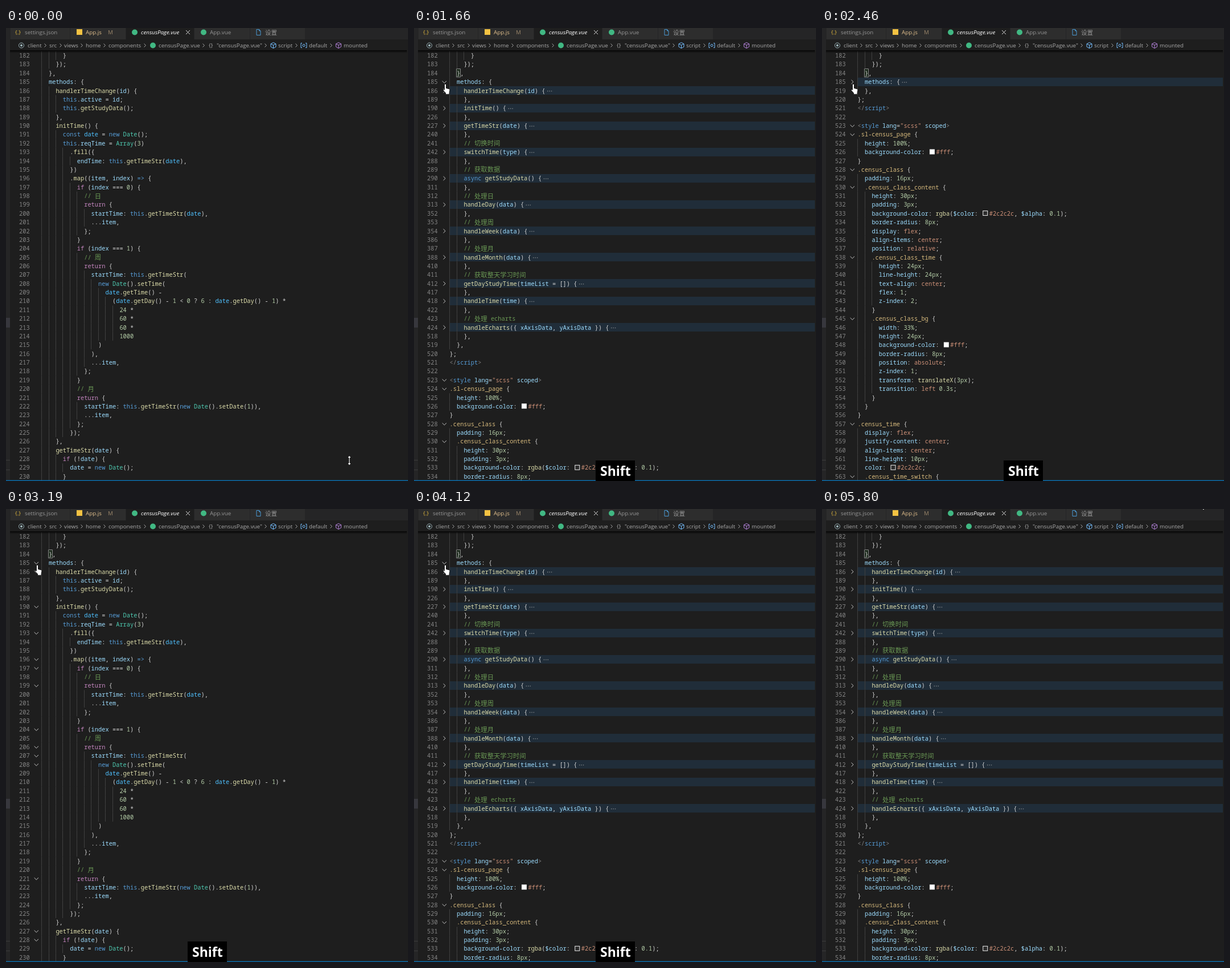
An HTML page with a canvas for the animation above (5940 ms loop, 706 by 794 pixels).

```html
<!DOCTYPE html>
<html>
<head>
<meta charset="utf-8">
<style>
html, body { margin: 0; width: 100%; height: 100%; overflow: hidden; background: #1e1e1e; }
canvas { display: block; }
</style>
</head>
<body>
<canvas id="stage" width="706" height="794"></canvas>
<script>
const ctx = document.getElementById('stage').getContext('2d');
const LOOP = 5940, ROWS = 49, LEFT = 62.5, TOP = 48.4, LINE = 15.37, CHAR = 6.222;
const MONO = '10.37px "Noto Sans Mono", monospace';
const CJK = '11.3px "Noto Sans CJK SC", "Noto Sans CJK", sans-serif';
const UI = '9.8px "Open Sans", "Noto Sans CJK SC", sans-serif';
const PLAIN = '#d4d4d4', BLUE = '#569cd6', SKY = '#9cdcfe', YELLOW = '#dcdcaa',
  GREEN = '#6a9955', NUM = '#b5cea8', ORANGE = '#ce9178', VUE = '#41b883';

const head = `      }
    });
  },
  methods: {`;
const body = `    handlerTimeChange(id) {
      this.active = id;
      this.getStudyData();
    },
    initTime() {
      const date = new Date();
      this.reqTime = Array(3)
        .fill({
          endTime: this.getTimeStr(date),
        })
        .map((item, index) => {
          if (index === 0) {
            // 日
            return {
              startTime: this.getTimeStr(date),
              ...item,
            };
          }
          if (index === 1) {
            // 周
            return {
              startTime: this.getTimeStr(
                new Date().setTime(
                  date.getTime() -
                    (date.getDay() - 1 < 0 ? 6 : date.getDay() - 1) *
                      24 *
                      60 *
                      60 *
                      1000
                )
              ),
              ...item,
            };
          }
          // 月
          return {
            startTime: this.getTimeStr(new Date().setDate(1)),
            ...item,
          };
        });
    },
    getTimeStr(date) {
      if (!date) {
        date = new Date();
      }`;
const outline = `186-189 handlerTimeChange(id) {
190-226 initTime() {
227-240 getTimeStr(date) {
241 // 切换时间
242-288 switchTime(type) {
289 // 获取数据
290-311 async getStudyData() {
312 // 处理日
313-352 handleDay(data) {
353 // 处理周
354-386 handleWeek(data) {
387 // 处理月
388-410 handleMonth(data) {
411 // 获取整天学习时间
412-417 getDayStudyTime(timeList = []) {
418-422 handleTime(time) {
423 // 处理 echarts
424-518 handleEcharts({ xAxisData, yAxisData }) {`;
const tail = `  },
};
<\/script>

<style lang="scss" scoped>
.sl-census_page {
  height: 100%;
  background-color: #fff;
}
.census_class {
  padding: 16px;
  .census_class_content {
    height: 30px;
    padding: 3px;
    background-color: rgba($color: #2c2c2c, $alpha: 0.1);
    border-radius: 8px;
    display: flex;
    align-items: center;
    position: relative;
    .census_class_time {
      height: 24px;
      line-height: 24px;
      text-align: center;
      flex: 1;
      z-index: 2;
    }
    .census_class_bg {
      width: 33%;
      height: 24px;
      background-color: #fff;
      border-radius: 8px;
      position: absolute;
      z-index: 1;
      transform: translateX(3px);
      transition: left 0.3s;
    }
  }
}
.census_time {
  display: flex;
  justify-content: center;
  align-items: center;
  line-height: 10px;
  color: #2c2c2c;
  .census_time_switch {`;

const number = (text, first) => text.split('\n').map((code, i) => ({ n: first + i, code }));
const headRows = number(head, 182), tailRows = number(tail, 519);
const outlineRows = outline.split('\n').flatMap(line => {
  const [, n, end, code] = line.match(/^(\d+)-?(\d*) (.*)/);
  const row = { n: +n, code: '    ' + code, folded: !!end };
  return end ? [row, { n: +end, code: '    },' }] : [row];
});
const views = {
  full: [...headRows, ...number(body, 186)],
  outline: [...headRows, ...outlineRows, ...tailRows],
  closed: [...headRows.slice(0, 3), { ...headRows[3], folded: true }, ...tailRows],
};

const jsRules = [
  [/\/\/ ?|echarts/y, GREEN],
  [/[\u4e00-\u9fff]+/y, GREEN],
  [/(const|new|this|async)\b|=>/y, BLUE],
  [/(return|if)\b/y, '#c586c0'],
  [/(Date|Array)\b/y, '#4ec9b0'],
  [/\d+/y, NUM],
  [/\w+(?=\()/y, YELLOW],
  [/\w+/y, SKY],
  [/\W/y, PLAIN],
];
const cssRules = [
  [/<\/?|>/y, '#808080'],
  [/(style|script)\b/y, BLUE],
  [/".*?"|#\w+/y, ORANGE],
  [/\d[\d.]*(px|%|s)?/y, NUM],
  [/\.[a-z][\w-]*/y, '#d7ba7d'],
  [/[\w$-]+(?=[:=])|scoped/y, SKY],
  [/\w+(?=\()/y, YELLOW],
  [/[a-z][\w-]*/y, ORANGE],
  [/./y, PLAIN],
];

function tokenize({ n, code }) {
  const rules = n > 518 ? cssRules : jsRules, tokens = [];
  for (let at = 0; at < code.length;) {
    for (const [rule, color] of rules) {
      rule.lastIndex = at;
      const match = rule.exec(code);
      if (!match) continue;
      const text = match[0];
      tokens.push({ text, color: text === 'date' && n < 227 ? '#4fc1ff' : color });
      at += text.length;
      break;
    }
  }
  return tokens;
}
for (const rows of Object.values(views)) for (const row of rows) row.tokens = tokenize(row);

function rect(x, y, w, h, color) {
  ctx.fillStyle = color;
  ctx.fillRect(x, y, w, h);
}
function text(str, x, y, color, font = UI) {
  ctx.font = font;
  ctx.fillStyle = color;
  ctx.fillText(str, x, y);
}
function disc(x, y, r, color) {
  ctx.fillStyle = color;
  ctx.beginPath();
  ctx.arc(x, y, r, 0, 7);
  ctx.fill();
}
function stroke(d, x, y, color, width = 1, fill) {
  const shape = new Path2D(d);
  ctx.save();
  ctx.translate(x, y);
  ctx.lineWidth = width;
  ctx.strokeStyle = color;
  if (fill) {
    ctx.fillStyle = fill;
    ctx.fill(shape);
  }
  ctx.stroke(shape);
  ctx.restore();
}

function drawRow(row, i, hover) {
  const y = TOP + i * LINE, indent = row.code.search(/\S/);
  if (row.folded) rect(62, Math.round(y - LINE / 2), 642, 15, '#202d39');
  for (let col = 0; col < indent; col += 2)
    rect(Math.round(LEFT + col * CHAR - 0.4), y - LINE / 2, 1, LINE, '#404040');
  text(row.n, 23, y + 3.7, '#858585', MONO);

  let x = LEFT;
  for (const { text: str, color } of row.tokens) {
    if (str[0] === '#') {
      rect(x + 2, y - 5, 9, 9, '#eee');
      rect(x + 3, y - 4, 7, 7, str);
      x += 13.5;
    }
    const wide = str >= '\u4e00';
    if (str !== ' ') text(str, x, y + (wide ? 4.2 : 3.7), color, wide ? CJK : MONO);
    x += str.length * (wide ? 11.3 : CHAR);
  }
  if (row.folded) {
    for (let k = 0; k < 3; k++) rect(x + 3.5 + k * 3.4, y, 1.4, 1.4, '#7f8487');
    stroke('M-1.8-3.5L1.8 0L-1.8 3.5', 53.3, y, '#c5c5c5');
  } else if (hover && /[{(]$|^<style/.test(row.code)) {
    ctx.globalAlpha = hover;
    stroke('M-3.7-1.6L0 2L3.7-1.6', 53.3, y, '#c5c5c5');
    ctx.globalAlpha = 1;
  }
}

const CUBE = 'M0-5L4.5-2.7V2.5L0 5L-4.5 2.5V-2.7ZM-4.5-2.7L0-.5L4.5-2.7M0-.5V5';

function drawChrome() {
  rect(0, 0, 706, 20, '#252526');
  rect(0, 20, 7, 774, '#252526');
  rect(0, 508, 7, 17, '#37373d');
  rect(0, 757, 7, 1, '#3c3c3c');
  rect(0, 774, 7, 1, '#3c3c3c');
  for (const [x, end] of [[8, 112], [113, 210], [331, 428], [429, 525]]) rect(x, 0, end - x, 20, '#2d2d2d');
  rect(211, 0, 119, 20, '#1e1e1e');

  const dim = '#969696';
  text('{.}', 16, 11, '#e0b83c');
  text('settings.json', 33, 11, dim);
  rect(124, 2, 10, 10, '#f5c242');
  text('App.js', 140, 11, '#e2c08d');
  text('M', 179, 11, '#9a866a');
  disc(226, 7.5, 5, VUE);
  text('censusPage.vue', 237, 11, '#fff', 'italic ' + UI);
  stroke('M-3.5-3.5L3.5 3.5M3.5-3.5L-3.5 3.5', 319.5, 7.5, '#ddd');
  disc(347, 7.5, 5, VUE);
  text('App.vue', 358, 11, dim);
  stroke('M-3.5-5H1L3.5-2.5V5H-3.5ZM1-5V-2.5H3.5', 443.5, 7.5, '#4a9bd6');
  text('设置', 455, 11.5, dim, CJK.replace('11.3', '10.5'));

  const crumb = '#a9a9a9';
  for (const [str, x] of [['client', 38], ['src', 76], ['views', 102], ['home', 140], ['components', 180],
    ['censusPage.vue', 268], ['{}', 356], ['"censusPage.vue"', 370], ['script', 478], ['default', 532], ['mounted', 593]])
    text(str, x, 33.7, crumb);
  for (const x of [69, 96, 133, 173, 244, 347, 456, 510, 571])
    stroke('M-1.5-3L1.5 0L-1.5 3', x, 30.5, crumb);
  stroke('M4.5 0A4.5 4.5 0 1 1-4.5 0A4.5 4.5 0 1 1 4.5 0', 27, 30.5, '#9db5ba');
  disc(27, 30.5, 2, '#9db5ba');
  disc(258, 30.5, 5, VUE);
  stroke(CUBE, 469.5, 30.5, '#75beff');
  stroke('M-3-4H-5V4H-3M3-4H5V4H3M-2 0A2 2 0 1 1 2 0A2 2 0 1 1-2 0', 523, 30.5, '#75beff');
  stroke(CUBE, 584, 30.5, '#b180d7');

  const shade = ctx.createLinearGradient(0, 39, 0, 44);
  shade.addColorStop(0, '#000c');
  shade.addColorStop(1, '#0000');
  rect(7, 39, 697, 5, shade);
  rect(0, 792.5, 706, 1.5, '#0a6aa8');
}

// Pointer hotspot: time, x, y
const track = [[0, 603, 758], [70, 603, 758], [650, 50, 93], [720, 53, 96], [950, 55, 102],
  [1110, 55, 102], [1380, 55, 98], [4480, 55, 98], [5000, 664, -14], [LOOP, 664, -14]];
const HAND = 'M-1.5 1.5a1.5 1.5 0 0 1 3 0V7.5l5 1.2q1.6.4 1.4 2L7 15.5v2.7H.5V16L-3.7 11.3q-.6-1.6 1-1.6l1.2.9Z';
const ARROW = 'M0 0V14L3.2 11L5.3 16L7.5 15L5.4 10.3H10Z';
const MIRRORED = 'M0 0V14L-3.2 11L-5.3 16L-7.5 15L-5.4 10.3H-10Z';
const RESIZE = 'M0-8.5L3.5-4.5H1V4.5H3.5L0 8.5L-3.5 4.5H-1V-4.5H-3.5Z';
const BEAM = 'M-2.5-7.5H2.5M0-7.5V7.5M-2.5 7.5H2.5';

function drawPointer(t) {
  const k = track.findIndex(key => key[0] > t), [t0, x0, y0] = track[k - 1], [t1, x1, y1] = track[k];
  const u = (t - t0) / (t1 - t0), ease = u * u * (3 - 2 * u);
  const x = x0 + (x1 - x0) * ease, y = y0 + (y1 - y0) * ease;
  if (t < 70) stroke(RESIZE, x, y, '#000', 0.8, '#fff');
  else if (t >= 720 && t < 4520) stroke(HAND, x, y, '#000', 0.8, '#fff');
  else if (t < 720 && x < 62) stroke(MIRRORED, x, y, '#000', 0.8, '#fff');
  else if (y < 40) stroke(ARROW, x, y, '#000', 0.8, '#fff');
  else stroke(BEAM, x, y, '#ddd');
}

const clamp = v => Math.max(0, Math.min(1, v));
const clicks = [[1520, 1660], [2400, 2460], [3060, 3190], [3980, 4120]];

function draw(t) {
  const view = t < 1660 ? 'full' : t < 2460 ? 'outline' : t < 3190 ? 'closed' : t < 4120 ? 'full' : 'outline';
  const hover = clamp((t - 700) / 300) * clamp((5000 - t) / 480);
  rect(0, 0, 706, 794, '#1e1e1e');
  if (t >= 1660) {
    rect(75, 72, 6, 14, '#1c2a1c');
    stroke('M0 0H7V14.5H0Z', 74.5, 71.5, '#888');
  }
  views[view].slice(0, ROWS).forEach((row, i) => drawRow(row, i, hover));
  drawChrome();

  if (t >= 1660 && t < 5550) {
    ctx.globalAlpha = clamp((5550 - t) / 280);
    rect(319, 758, 69, 36, '#000');
    text('Shift', 327, 785, '#fff', 'bold 23px "Open Sans", sans-serif');
    ctx.globalAlpha = 1;
  }
  if (clicks.some(([from, to]) => t >= from && t < to)) disc(54, 97, 10, 'rgba(255,255,0,.47)');
  drawPointer(t);
}

function tick(now) {
  draw(now % LOOP);
  requestAnimationFrame(tick);
}
requestAnimationFrame(tick);
</script>
</body>
</html>
```
